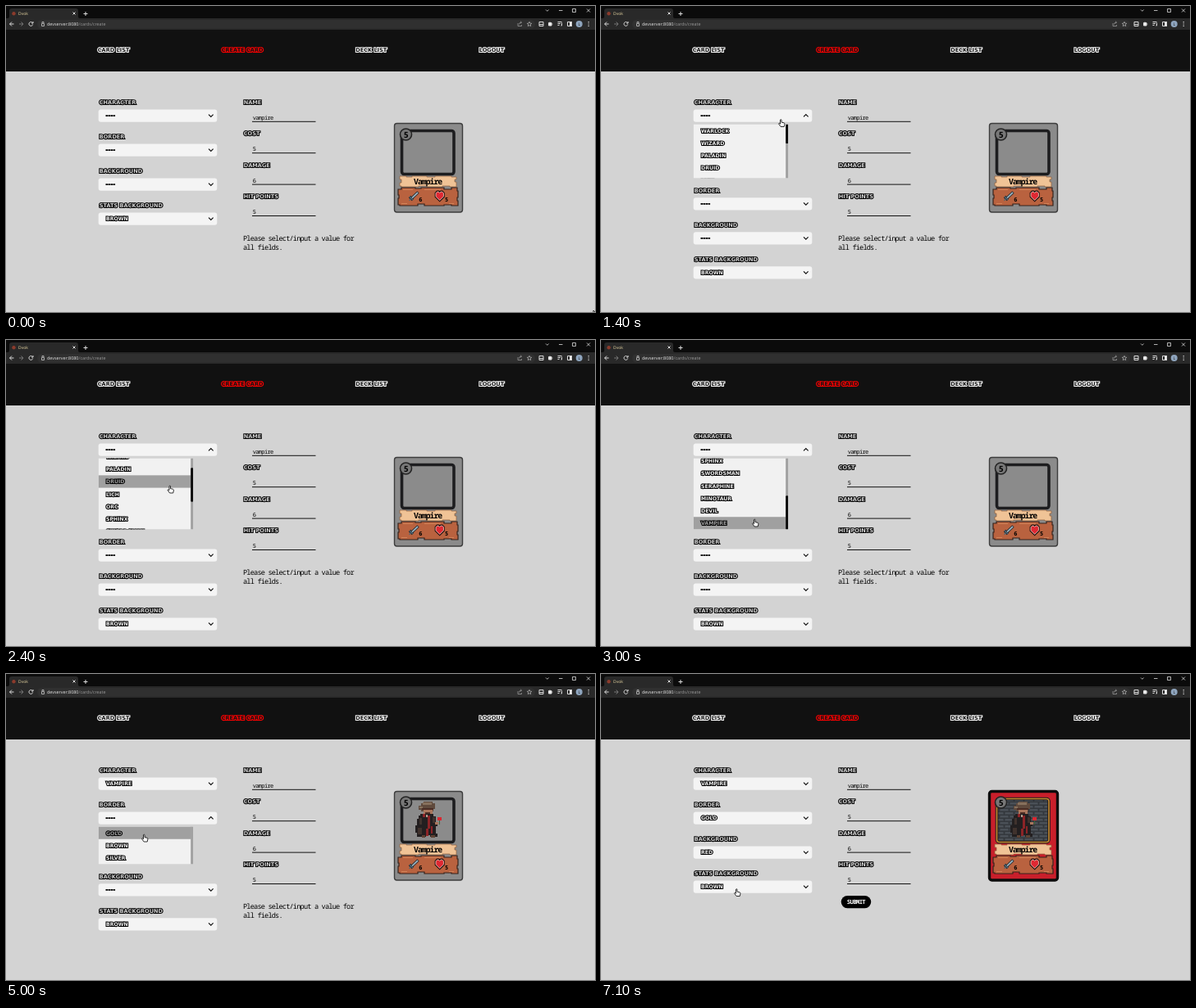
Write an HTML page that moves like this. It is 718 px wide and 374 px high and loops after 7.2 s.

```html
<!DOCTYPE html>
<html lang="en">
<head>
<meta charset="utf-8">
<title>Create card</title>
<style>
html, body { margin: 0; width: 100%; height: 100%; overflow: hidden; background: #d3d3d3; }
svg { display: block; }
text { white-space: pre; text-rendering: geometricPrecision; }
.ui { font: 5px "Open Sans", sans-serif; fill: #e6e6e6; }
.pix { font: bold 6.6px "DejaVu Sans", sans-serif; fill: #d3d3d3; stroke: #000; stroke-width: 2.1px; stroke-linejoin: miter; stroke-miterlimit: 2; paint-order: stroke; }
.nav { fill: #111; stroke: #fff; }
.nav.on { stroke: #f00; }
.opt { font-size: 6.2px; fill: #f4f4f4; }
.opt.hot { fill: #a0a0a0; }
.mono { font: 500 7px "Noto Sans Mono", monospace; letter-spacing: -.68px; fill: #000; }
.msg { font-size: 8.6px; letter-spacing: -.81px; }
.b { font-weight: bold; }
.line { fill: none; stroke: #dcdcdc; stroke-width: 1; }
</style>
</head>
<body>
<svg id="stage" width="718" height="374" viewBox="0 0 718 374">
  <defs>
    <pattern id="bricks" width="12" height="8" patternUnits="userSpaceOnUse">
      <path fill="#3f444a" d="M0 0h12v8H0z"/>
      <path fill="#4a5057" d="M1 1h9v2H1zM7 5h5v2H7zM0 5h4v2H0z"/>
      <path fill="none" stroke="#33373c" d="M0 .5h12M0 4.500h12M11.500 0v4M5.500 4v4"/>
    </pattern>
  </defs>

  <!-- browser bar -->
  <path fill="#0b0b0b" d="M0 0h718v30H0z"/>
  <path fill="#292929" d="M0 15h2q2 0 2-2V6q0-3 3-3h78q3 0 3 3v7q0 2 2 2h628v14H0z"/>
  <rect x="38" y="17" width="607" height="10.500" rx="5.200" fill="#303030"/>
  <circle cx="9.500" cy="9.300" r="2.200" fill="#8c3b2c"/>
  <text class="ui" x="15" y="11" style="fill:#ead9a4">Dvok</text>
  <text class="ui" x="50" y="24" style="font-size:5.400px">devserver:8080<tspan fill="#999">/cards/create</tspan></text>
  <g class="line">
    <path d="M81.500 7.500l3 3m0-3l-3 3M94.500 9.500h5m-2.500-2.500v5"/>
    <path d="M9.500 22H4.500m2.500-2.500L4.500 22l2.500 2.500"/>
    <path stroke="#777" d="M16 22h5m-2.500-2.500L21 22l-2.500 2.500"/>
    <path d="M32.300 20.500a2.400 2.400 0 1 0 .4 2M33 19v2h-2"/>
    <path stroke="#aaa" d="M43.500 21.500h3v3h-3zM44 21v-1.500h2V21"/>
    <path stroke="#999" stroke-width=".8" d="M624 21v3.500h4.500V23M625.500 22.500q0-2.500 3-2.500m-1.500-1.200l1.500 1.200-1.500 1.500"/>
    <path stroke="#bbb" stroke-width=".7" d="M638 19.300l.8 1.800 2 .2-1.500 1.300.4 2-1.700-1-1.700 1 .4-2-1.500-1.300 2-.2z"/>
    <path d="M650 19.500h5v5h-5zM650 22.500h5"/>
    <path fill="#eee" d="M661.500 20.500h3.500v3.500h-3.500zM663 19.500v1M665.500 22h.8"/>
    <path d="M672.500 19.500h5m-5 2h3.500m-3.500 2h2m3-3v3.500h-1"/>
    <path d="M684.500 19.500h5v5h-5z"/>
    <path fill="#eee" d="M687.500 19.500h2v5h-2z"/>
    <path stroke-width=".8" d="M658 4.500l1.800 1.800 1.800-1.800M674 5.500h4.500M690.500 3.500h4v4h-4zM708 3.500l4 4m0-4l-4 4"/>
  </g>
  <circle cx="698.700" cy="22" r="4" fill="#8fa5be"/>
  <text class="ui" x="697.400" y="23.800" style="fill:#222">L</text>
  <path fill="#ddd" d="M709.600 19h1.200v1.200h-1.200zM709.600 21.400h1.200v1.200h-1.200zM709.600 23.800h1.200V25h-1.200z"/>

  <path fill="#111" d="M0 29h718v51H0z"/>
  <g id="page"></g>

  <!-- card -->
  <g id="card">
    <rect id="face" x="473.500" y="143.500" width="83" height="108.500" rx="3"/>
    <rect id="scene" x="483" y="153" width="63" height="52"/>
    <g id="hero" shape-rendering="crispEdges">
      <path fill="#231f20" d="M505 171h16v3h3v7h2v5h-2v9h2v4h-9v-2h-5v2h-11v-5h-2v-9h2v-8h2v-4h2z"/>
      <path fill="#40322d" d="M504 176h3v8h-3zM502 188h5v8h-5zM520 175h3v7h-3z"/>
      <path fill="#5f4a3d" d="M503 161h3v-3h3v-2h11v2h3v7h-2v3h-15v-2h-3z"/>
      <path fill="#86705c" d="M508 157h11v3h-11zM504 162h4v2h-4z"/>
      <path fill="#a9765c" d="M509 164h11v7h-11zM523 181h4v3h-4z"/>
      <path fill="#4a2c24" d="M507 164h14v2h-14zM511 169h6v2h-6z"/>
      <path fill="#8c2427" d="M508 171h3v4h-3zM514 173h3v16h-3zM512 189h3v9h-3zM518 186h2v9h-2z"/>
      <path fill="#b3a090" d="M512 172h2v3h-2z"/>
      <path fill="#d92832" d="M526 175h5v4h-5z"/>
      <path fill="#456438" d="M528 179h1v5h-1z"/>
      <path fill="#5e4334" d="M507 197h4v3h-4zM518 197h5v3h-5z"/>
    </g>
    <rect x="482.500" y="152.500" width="63.500" height="53" rx="3" fill="none" stroke="#1d1d1f" stroke-width="3.600"/>
    <rect id="frame" x="482.500" y="152.500" width="63.500" height="53" rx="3" fill="none" stroke="#c98a2e" stroke-width="1.600"/>
    <circle cx="487.500" cy="157" r="7" fill="#777" stroke="#252525" stroke-width="1.600"/>
    <path fill="#f0c396" stroke="#8d5c3c" stroke-width=".7" d="M480 208h8v1h7v-1h18v1h10v-1h20v1h6v3h-2v3h2v6h-8v-1h-9v1h-19v-1h-10v1h-21v-1h-2v-4h2v-4h-2z"/>
    <path fill="#b9623f" stroke="#36231d" stroke-width="1.200" d="M478 224h4v-2h17v1h7v-1h28v2h9v-2h7v4h1v8h-1v4h1v6h-8v-1h-9v1h-24v-2h-8v2h-22v-1h-2v-8h1v-4h-1z"/>
    <path fill="none" stroke="#d18257" d="M484 224.500h12M510 224.500h20M482 241.500h7M540 241.500h6"/>
    <path fill="none" stroke="#20272d" stroke-width="3.400" d="M493 236.500l9.500-9M492 233l4 4"/>
    <path fill="none" stroke="#9ab0bd" stroke-width="1.800" d="M495 234.600l7-6.600"/>
    <path fill="none" stroke="#506a79" stroke-width="1.300" d="M492 233l4 4M491.500 237.700l2-2"/>
    <path fill="#df2833" stroke="#210c0d" stroke-width="2.800" paint-order="stroke" d="M528.700 237.500l-4.700-4.700v-4l1.800-1.800h1.400l1.500 1.500 1.500-1.500h1.400l1.800 1.800v4z"/>
    <path fill="none" stroke="#f5dcc9" stroke-width=".8" d="M528.700 237.500l-4.700-4.700v-4l1.800-1.800h1.400l1.500 1.500 1.500-1.500h1.400l1.800 1.800v4z"/>
    <text class="mono b" x="484.800" y="160.600" style="font-size:10px">5</text>
    <text class="mono b" x="497" y="218.400" style="font-size:9.800px;letter-spacing:-1px">Vampire</text>
    <text class="mono b" x="503.300" y="239.200">6</text>
    <text class="mono b" x="535" y="239.200">5</text>
  </g>

  <g id="message">
    <text class="mono msg" x="289" y="287.400">Please select/input a value for</text>
    <text class="mono msg" x="289" y="298.400">all fields.</text>
  </g>
  <g id="submit">
    <rect x="292.700" y="271" width="36.500" height="15.200" rx="7.600"/>
    <text class="mono b" x="299.800" y="281" style="fill:#fff;font-size:7.200px;letter-spacing:-.6px">SUBMIT</text>
  </g>

  <path id="arrow" fill="#fff" stroke="#000" stroke-width=".8" d="M0 0v9l2.100-1.900 1.300 3 1.500-.7-1.300-2.800h2.900z"/>
  <path id="hand" fill="#fff" stroke="#000" stroke-width=".8" d="M0 .6q.8-.8 1.500 0v3l3 .7q1.100.4.900 1.500l-.7 3.200H.6L-1.900 5.600q0-1 1-.7l.9.8z"/>
</svg>
<script>
const LOOP = 7200, STEP = 100, ROW = 15.25, MAX_H = 87, SLIDE = 295;
const NS = 'http://www.w3.org/2000/svg';
const $ = id => document.getElementById(id);
const page = $('page');

const fields = [
  { label: 'CHARACTER', open: 1200, pick: 3300, choice: 11, options: ['WARLOCK', 'WIZARD', 'PALADIN', 'DRUID', 'LICH', 'ORC',
    'SPHINX', 'SWORDSMAN', 'SERAPHINE', 'MINOTAUR', 'DEVIL', 'VAMPIRE'] },
  { label: 'BORDER', open: 4400, pick: 5100, choice: 0, options: ['GOLD', 'BROWN', 'SILVER'] },
  { label: 'BACKGROUND', open: 5600, pick: 6500, choice: 2, options: ['GRAY', 'BLUE', 'RED', 'GREEN', 'GOLD'] },
  { label: 'STATS BACKGROUND', open: Infinity, pick: 0, choice: 0, options: ['BROWN'] }
];

// [time, x, y] of the pointer tip
const pointer = [[0, 716, 372], [100, 552, 220], [200, 552, 220], [600, 330, 165], [1000, 223, 140], [1400, 218.5, 138.5],
  [1700, 214, 146], [2000, 201, 173], [2400, 199, 178], [3000, 186.5, 219], [3400, 186, 219], [4000, 172, 178],
  [4500, 170, 177], [5000, 167.5, 196], [5200, 168, 196], [5600, 171.5, 217], [6000, 171.5, 217], [6400, 164.5, 262.5]];
const wheel = [[2200, 0], [2800, 12 * ROW - MAX_H]];

function add(parent, name, attrs, text) {
  const el = document.createElementNS(NS, name);
  set(el, attrs);
  if (text) el.textContent = text;
  return parent.appendChild(el);
}
function set(el, attrs) {
  for (const k in attrs) el.setAttribute(k, attrs[k]);
}
function show(el, on) {
  el.style.display = on ? '' : 'none';
}
function ease(p) {
  p = Math.min(1, Math.max(0, p));
  return p * p * (3 - 2 * p);
}
function track(keys, t, i) {
  if (t <= keys[0][0]) return keys[0][i];
  for (let n = 1; n < keys.length; n++) {
    const a = keys[n - 1], b = keys[n];
    if (t < b[0]) return a[i] + (b[i] - a[i]) * ease((t - a[0]) / (b[0] - a[0]));
  }
  return keys[keys.length - 1][i];
}
function pix(parent, x, y, text, cls = '') {
  return add(parent, 'text', { class: 'pix ' + cls, x, y }, text);
}

function build() {
  pix(page, 111.7, 56.4, 'CARD LIST', 'nav');
  pix(page, 262.7, 56.4, 'CREATE CARD', 'nav on');
  pix(page, 426.2, 56.4, 'DECK LIST', 'nav');
  pix(page, 576.7, 56.4, 'LOGOUT', 'nav');

  [['NAME', 'vampire'], ['COST', '5'], ['DAMAGE', '6'], ['HIT POINTS', '5']].forEach(([label, value], i) => {
    const y = i * 38.4;
    pix(page, 289.7, 119.9 + y, label);
    add(page, 'text', { class: 'mono', x: 300.8, y: 139 + y }, value);
    add(page, 'path', { d: `M300 ${141.3 + y}h77.500`, stroke: '#111' });
  });

  fields.forEach((f, i) => {
    const g = f.group = add(page, 'g', {});
    const y = i * 42;
    pix(g, 113.7, 119.9 + y, f.label);
    add(g, 'rect', { x: 112.7, y: 126.4 + y, width: 144.6, height: 15.3, rx: 3, fill: '#f4f4f4' });
    f.value = pix(g, 122, 136.3 + y, '', 'opt');
    f.dashes = add(g, 'path', { d: `M121.500 ${134.2 + y}h12`, stroke: '#000', 'stroke-width': 1.8, 'stroke-dasharray': '2.600 .400' });
    f.chevron = add(g, 'path', { fill: 'none', stroke: '#111', 'stroke-width': 1.2 });
    f.size = f.options.length * ROW;
    f.panel = add(g, 'svg', { x: 112.7, y: 144.5 + y, width: 115.5, height: 0 });
    add(f.panel, 'rect', { width: 113, height: MAX_H, fill: '#f1f1f1' });
    f.list = add(f.panel, 'g', {});
    f.mark = add(f.list, 'rect', { width: 113, height: ROW, fill: '#a0a0a0' });
    f.items = f.options.map((o, n) => pix(f.list, 9.3, n * ROW + 10, o, 'opt'));
    add(f.panel, 'rect', { x: 112.5, width: 3, height: MAX_H, fill: '#a0a0a0' });
    f.thumb = add(f.panel, 'rect', { x: 112.5, width: 3, rx: 1.2, fill: '#0a0a0a' });
  });
}

function draw(t) {
  const x = track(pointer, t, 1), y = track(pointer, t, 2);
  let shift = 0;

  fields.forEach((f, i) => {
    const isOpen = t >= f.open && t < f.pick, picked = t >= f.pick;
    const full = Math.min(f.size, MAX_H);
    const h = full * (ease((t - f.open) / SLIDE) - (f.open < f.pick ? ease((t - f.pick) / SLIDE) : 0));
    const scroll = i ? 0 : track(wheel, t, 1);
    const mid = 134 + i * 42, dir = isOpen ? -1 : 1;

    set(f.group, { transform: `translate(0 ${shift})` });
    f.value.textContent = picked ? f.options[f.choice] : '';
    show(f.dashes, !picked);
    set(f.chevron, { d: `M247 ${mid - 1.3 * dir}l2.800 ${2.8 * dir} 2.800 ${-2.8 * dir}` });

    show(f.panel, h > .5);
    set(f.panel, { height: Math.max(0, h) });
    set(f.list, { transform: `translate(0 ${-scroll})` });
    const inside = y - (144.5 + i * 42 + shift);
    const hot = inside >= 0 && inside < h ? Math.floor((inside + scroll) / ROW) : -1;
    show(f.mark, hot >= 0);
    set(f.mark, { y: hot * ROW });
    f.items.forEach((el, n) => el.classList.toggle('hot', n === hot));
    show(f.thumb, h < f.size - 1);
    set(f.thumb, { y: scroll * h / f.size, height: Math.max(0, h * h / f.size) });
    shift += h;
  });

  const [hero, border, back] = fields.map(f => t >= f.pick);
  show($('hero'), hero);
  show($('frame'), border);
  set($('scene'), { fill: border ? 'url(#bricks)' : '#8b8b8b' });
  set($('face'), { fill: back ? '#c91f2b' : '#8b8b8b', stroke: back ? '#0c0c0c' : '#3c3c3c', 'stroke-width': back ? 3.4 : 1.4 });
  show($('message'), !back);
  show($('submit'), back);

  const pointing = t >= 900;
  show($('arrow'), !pointing);
  show($('hand'), pointing);
  set($(pointing ? 'hand' : 'arrow'), { transform: `translate(${x} ${y})` });
}

function tick() {
  draw(Math.floor(performance.now() % LOOP / STEP) * STEP);
  requestAnimationFrame(tick);
}
build();
tick();
</script>
</body>
</html>
```
